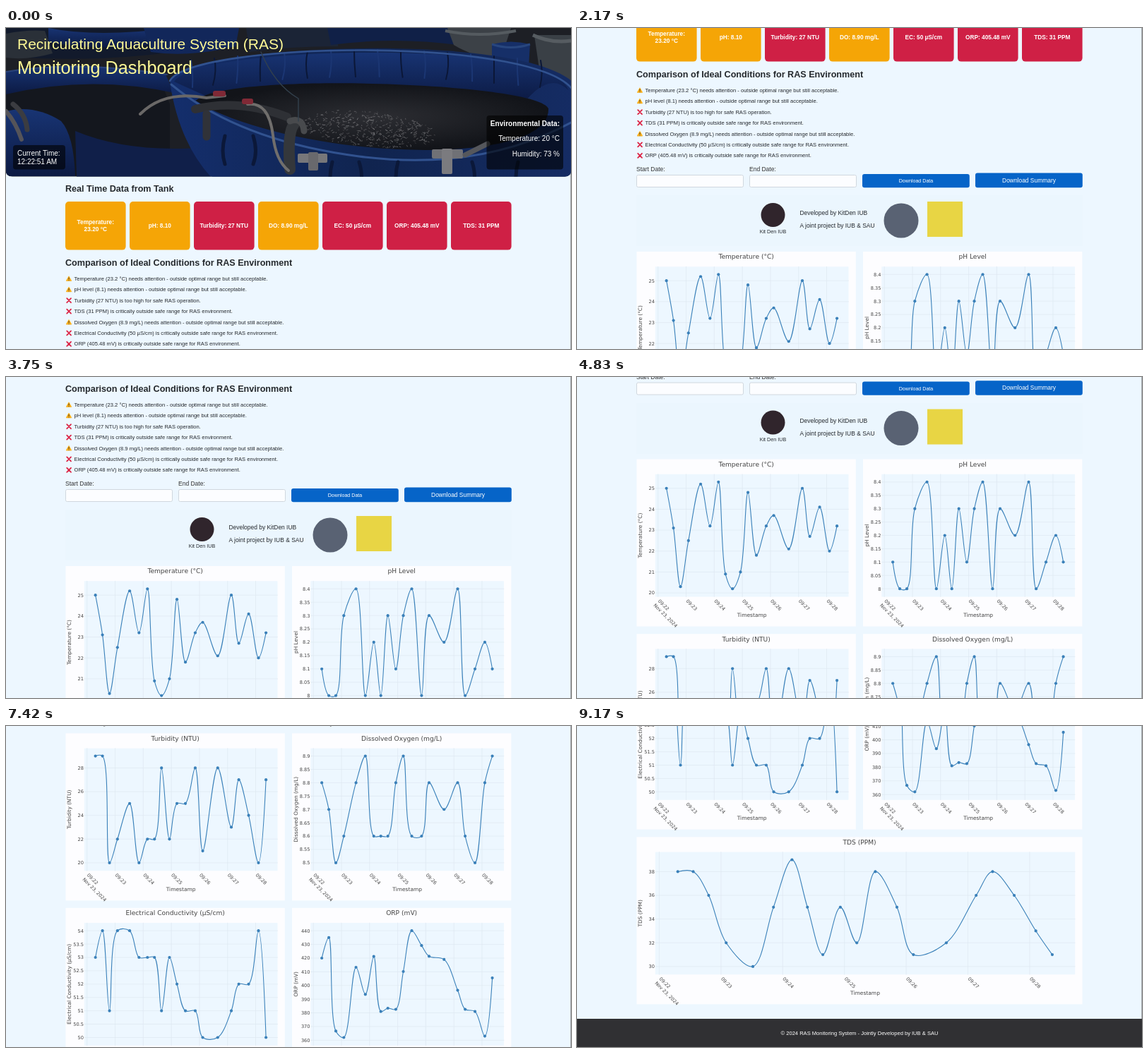
An HTML page for the animation above (9250 ms loop, 800 by 455 pixels).

```html
<!DOCTYPE html>
<html lang="en">
<head>
<meta charset="utf-8">
<title>Monitoring Dashboard</title>
<style>
  html, body { margin: 0; width: 100%; height: 100%; overflow: hidden; background: #edf7ff; }
  #stage { position: absolute; left: 0; top: 0; width: 800px; height: 455px; overflow: hidden; }
  #edge { position: absolute; right: 0; top: 0; width: 1px; height: 455px; background: #a3a8ad; }
  #page { position: absolute; left: 0; top: 0; display: block; }
  text { font-family: "Liberation Sans", Arial, sans-serif; white-space: pre; }
  .plot text { font-family: "DejaVu Sans", Verdana, sans-serif; fill: #444; }
</style>
</head>
<body>
<div id="stage">
  <div id="edge"></div>
  <svg id="page" width="800" height="1625" viewBox="0 0 800 1625"></svg>
</div>
<script>
const LOOP = 9250, FPS = 12;
const INK = '#25292d';

const text = (x, y, size, str, fill = INK, extra = '') =>
  `<text x="${x}" y="${y}" font-size="${size}" fill="${fill}" ${extra}>${str}</text>`;
const rect = (x, y, w, h, fill, r = 0, extra = '') =>
  `<rect x="${x}" y="${y}" width="${w}" height="${h}" rx="${r}" fill="${fill}" ${extra}/>`;
const path = (d, fill, extra = '') => `<path d="${d}" fill="${fill}" ${extra}/>`;
const stroke = (d, color, width) =>
  path(d, 'none', `stroke="${color}" stroke-width="${width}" stroke-linecap="round"`);
const BOLD = 'font-weight="700"', MID = 'text-anchor="middle"', END = 'text-anchor="end"';

function seeded(seed) {
  return () => (seed = (seed * 16807) % 2147483647) / 2147483647;
}

function hero() {
  const rnd = seeded(42);
  let foam = '', folds = '';
  for (let i = 0; i < 420; i++) {
    const a = rnd() * 6.283, r = Math.sqrt(rnd());
    const x = 512 + Math.cos(a) * r * 96, y = 143 + Math.sin(a) * r * 25 + (x - 512) * 0.09;
    const shade = 80 + Math.round(rnd() * 90 * (1.1 - r * 0.6));
    foam += stroke(`M${x.toFixed(1)} ${y.toFixed(1)}l${(rnd() * 6 - 3).toFixed(1)} ${(rnd() * 3 - 1).toFixed(1)}`,
      `rgb(${shade},${shade},${shade + 3})`, 0.7);
  }
  for (let i = 0; i < 16; i++) {
    const x = 262 + i * 33, top = 46 - 15 * Math.sin(i / 15 * Math.PI);
    folds += stroke(`M${x} ${top}q${rnd() * 8 - 4} 18 ${rnd() * 6 - 3} 38`, i % 2 ? '#0b1737' : '#1b3673', 2);
  }
  return `<defs>
    <clipPath id="heroClip"><path d="M0 0H800V202Q800 210.5 791 210.5H9Q0 210.5 0 202Z"/></clipPath>
    <linearGradient id="tarp" x2="0" y2="1"><stop stop-color="#183473"/><stop offset="1" stop-color="#0c1a43"/></linearGradient>
    <linearGradient id="wall" x2="1" y2="0"><stop stop-color="#142e6c"/><stop offset=".5" stop-color="#10244f"/><stop offset="1" stop-color="#152c64"/></linearGradient>
    <radialGradient id="water"><stop stop-color="#2d2e33"/><stop offset="1" stop-color="#121419"/></radialGradient>
  </defs><g clip-path="url(#heroClip)">`
    + rect(0, 0, 800, 211, '#1d1f25')
    + path('M0 0H250L238 34Q120 50 0 40Z', '#121a2c')
    + path('M60 0Q130 14 235 0V18Q150 36 60 20Z', 'url(#tarp)')
    + path('M0 8Q30 2 55 4L66 36Q30 46 0 42Z', '#2a3038')
    + path('M195 0H330L325 26Q260 42 205 34Z', '#12275a')
    + path('M340 0H470V26Q400 26 345 34Z', '#1b2436')
    + path('M455 0H640V24Q550 12 460 24Z', '#102047')
    + path('M625 0H715L700 46Q660 40 634 24Z', '#3c4147')
    + path('M622 4Q670 14 722 4', 'none', 'stroke="#555b60" stroke-width="4"')
    + path('M688 23Q715 16 742 23L738 88Q712 70 688 62Z', '#162f68')
    + path('M688 23Q715 32 742 23', 'none', 'stroke="#28467e" stroke-width="3"')
    + path('M748 10H800V112L760 92Z', '#3a4046')
    + path('M746 10Q772 22 800 18', 'none', 'stroke="#565c61" stroke-width="5"')
    // left tank
    + path('M0 74Q90 56 218 72L232 108V210H0Z', '#14171e')
    + path('M0 62Q100 44 226 66L238 92Q120 66 0 94Z', 'url(#tarp)')
    + path('M0 118Q40 108 78 132Q96 152 98 210H0Z', 'url(#tarp)')
    + path('M98 146Q170 176 270 170L290 211H100Z', '#101f49')
    + stroke('M0 62Q100 45 228 66', '#2a4379', 2)
    + stroke('M0 118Q14 134 22 158', '#555459', 6)
    + stroke('M10 108Q28 122 30 144', '#3b3c41', 7)
    // main tank
    + path('M232 75C250 20 780 2 812 90V211H292Z', 'url(#wall)')
    + path('M238 76C268 24 776 14 796 88Q770 62 735 104Q520 62 300 104Z', 'url(#tarp)') + folds
    + path('M268 104C300 62 750 76 768 114C772 198 420 190 268 104Z', 'url(#water)')
    + stroke('M232 75C262 18 772 10 806 94', '#31528f', 2.6)
    + foam
    + path('M232 76Q330 158 500 181T800 130V211H290Q244 160 232 76Z', 'url(#wall)')
    + stroke('M234 80Q330 160 500 182T800 134', '#31528f', 3)
    + [310, 350, 462, 500, 555, 660, 725].map((x, i) =>
      stroke(`M${x} ${i < 2 ? 153 : 190}q${i % 2 ? 7 : -6} 22 0 40`, '#0b1839', 5)).join('')
    // pipes and hoses
    + stroke('M268 115Q330 100 398 126', '#2e3035', 12)
    + stroke('M284 122V154', '#303238', 11)
    + stroke('M408 136Q398 148 402 200', '#34373b', 16)
    + stroke('M402 132Q420 126 422 146', '#484a4d', 9)
    + stroke('M190 122Q224 88 284 99L310 96', '#6a6867', 4)
    + stroke('M342 108Q372 104 378 152Q382 188 400 202', '#706e6c', 4)
    + stroke('M361 34Q380 80 414 100L414 132', '#33404d', 1.4)
    + rect(293, 89, 18, 8, '#802936', 3) + rect(334, 100, 16, 8, '#802936', 3)
    + rect(413, 178, 42, 13, '#77777a', 2) + rect(428, 176, 14, 26, '#69696d', 2)
    + rect(603, 172, 44, 13, '#707176', 2) + rect(617, 171, 15, 36, '#7b7b7f', 2)
    + stroke('M650 180L682 164', '#55575c', 7)
    + text(16, 30, 21, 'Recirculating Aquaculture System (RAS)', '#fffa96')
    + text(16, 65, 25.2, 'Monitoring Dashboard', '#fffa96')
    + rect(10, 166, 74, 34.5, 'rgba(0,0,0,.6)', 4)
    + text(16, 181, 10, 'Current Time:', '#fff')
    + text(16, 192.6, 10, '12:22:51 AM', '#fff', 'id="clock"')
    + rect(680.5, 124, 108.5, 76.5, 'rgba(0,0,0,.6)', 4)
    + text(784, 138.6, 10.1, 'Environmental Data:', '#fff', `${BOLD} ${END}`)
    + text(784, 160.4, 10, 'Temperature: 20 °C', '#fff', END)
    + text(784, 182.3, 10, 'Humidity: 73 %', '#fff', END)
    + '</g>';
}

function cards() {
  const labels = ['Temperature:|23.20 °C', 'pH: 8.10', 'Turbidity: 27 NTU', 'DO: 8.90 mg/L',
    'EC: 50 µS/cm', 'ORP: 405.48 mV', 'TDS: 31 PPM'];
  const mild = [0, 1, 3];
  return labels.map((label, i) => {
    const x = 84 + i * 91, lines = label.split('|');
    return rect(x, 246, 85.6, 68.6, mild.includes(i) ? '#f5a506' : '#cf2045', 5)
      + lines.map((line, k) => text(x + 42.8, 283.2 + (k - (lines.length - 1) / 2) * 10,
        8.3, line, '#fff', `${BOLD} ${MID}`)).join('');
  }).join('');
}

function notices() {
  const soft = 'needs attention - outside optimal range but still acceptable.';
  const hard = 'is critically outside safe range for RAS environment.';
  const rows = [
    ['Temperature (23.2 °C) ' + soft, 1], ['pH level (8.1) ' + soft, 1],
    ['Turbidity (27 NTU) is too high for safe RAS operation.', 0],
    ['TDS (31 PPM) ' + hard, 0], ['Dissolved Oxygen (8.9 mg/L) ' + soft, 1],
    ['Electrical Conductivity (50 µS/cm) ' + hard, 0], ['ORP (405.48 mV) ' + hard, 0]];
  return rows.map(([label, warn], i) => {
    const y = 355.2 + i * 15.4;
    const icon = warn
      ? path(`M89 ${y - 3}L92.4 ${y + 3}H85.6Z`, '#f9b01c', 'stroke="#f9b01c" stroke-width="1.2" stroke-linejoin="round"')
        + stroke(`M89 ${y - 1.2}v2M89 ${y + 2.4}v.1`, '#40352a', 1)
      : stroke(`M86.2 ${y - 2.8}l5.8 6M92 ${y - 2.8}l-5.8 6`, '#dc2546', 1.8);
    return icon + text(96.5, y + 2.7, 7.57, label);
  }).join('');
}

function form() {
  const field = (x, label) => text(x, 470, 8.5, label, '#333')
    + rect(x + .5, 475.5, 151, 17, '#fcfdff', 2, 'stroke="#d0d7de"');
  const button = (x, y, size, label) => rect(x, y, 151.8, 493.2 - y, '#0664c8', 3)
    + text(x + 76, (y + 493.2) / 2 + size * .34, size, label, '#fff', MID);
  return field(84, 'Start Date:') + field(244, 'End Date:')
    + button(404, 474, 7.1, 'Download Data') + button(564, 472.6, 8.44, 'Download Summary');
}

function credits() {
  return rect(84, 504, 632, 72, '#ebf6fe')
    + '<circle cx="277.5" cy="532" r="17" fill="#30252c"/>'
    + text(277.5, 558, 7.2, 'Kit Den IUB', INK, MID)
    + text(315.5, 532.3, 8.45, 'Developed by KitDen IUB')
    + text(315.5, 550.3, 8.45, 'A joint project by IUB &amp; SAU')
    + '<circle cx="459" cy="540" r="24.5" fill="#596273"/>'
    + rect(496, 513, 50, 50, '#e8d544');
}

const SECONDS = [18, 33, 48, 65, 91, 111, 129, 144, 159, 176, 192, 210, 231, 247, 279, 308, 324, 345, 366, 382];

// Centripetal Catmull-Rom spline with quadratic end pieces.
function spline(pts) {
  const handles = pts.slice(1, -1).map(([x, y], i) => {
    const [ax, ay] = [pts[i][0] - x, pts[i][1] - y];
    const [bx, by] = [pts[i + 2][0] - x, pts[i + 2][1] - y];
    const a = Math.hypot(ax, ay) ** .5, b = Math.hypot(bx, by) ** .5;
    const nx = b * b * ax - a * a * bx, ny = b * b * ay - a * a * by;
    const p = 3 * b * (a + b), q = 3 * a * (a + b);
    return [[x + nx / p, y + ny / p], [x - nx / q, y - ny / q]];
  });
  let d = `M${pts[0]}Q${handles[0][0]} ${pts[1]}`;
  for (let i = 2; i < pts.length - 1; i++) d += `C${handles[i - 2][1]} ${handles[i - 1][0]} ${pts[i]}`;
  return d + `Q${handles.at(-1)[1]} ${pts.at(-1)}`;
}

function chart(col, row, title, [lo, hi, step], values, wide = false) {
  const x = col ? 405 : 84.5, y = 584 + row * 247.6, w = wide ? 631 : 310.3;
  const left = x + 26.3, width = w - 36.6;
  const origin = left + (wide ? 5.7 : 3.9), minute = wide ? 87.4 : 39.8;
  const max = Math.max(...values), min = Math.min(...values);
  const px = s => origin + s / 60 * minute;
  const py = v => y + 32.3 + (max - v) / (max - min) * 151.3;
  let out = rect(x, y, w, 237, '#fdfdff') + rect(left, y + 21.3, width, 173.7, '#edf7ff');
  const grid = d => stroke(d, '#dee9f1', .7);

  for (let v = lo; v <= hi + step / 9; v += step) {
    out += grid(`M${left} ${py(v)}h${width}`)
      + text(left - .8, py(v) + 2.4, 6.6, parseFloat(v.toFixed(2)), INK, END);
  }
  for (let m = 0; m < 7; m++) {
    const tx = px(m * 60);
    out += grid(`M${tx} ${y + 21.3}v173.7`)
      + `<g transform="translate(${tx - .5} ${y + 201.5}) rotate(45)">${text(0, 0, 6.6, '09:2' + (2 + m))}`
      + (m ? '' : text(0, 8.6, 6.6, 'Nov 23, 2024')) + '</g>';
  }
  const pts = values.map((v, i) => [px(SECONDS[i]), py(v)]);
  out += stroke(spline(pts), '#3a80b9', 1.1)
    + pts.map(([cx, cy]) => `<circle cx="${cx}" cy="${cy}" r="2.1" fill="#3a80b9"/>`).join('')
    + text(x + w / 2, y + 10.4, 9.1, title, INK, MID)
    + text(left + width / 2, y + 223.4, 7.5, 'Timestamp', INK, MID)
    + `<g transform="translate(${x + 7.5} ${y + 108}) rotate(-90)">${text(0, 0, 7.4, title, INK, MID)}</g>`;
  return `<g class="plot">${out}</g>`;
}

const charts = () => [
  [0, 0, 'Temperature (°C)', [20, 25, 1],
    [25, 23.1, 20.3, 22.5, 25.2, 23.2, 25.3, 20.9, 20.2, 21, 24.8, 21.8, 23.2, 23.7, 22.1, 25, 22.7, 24.1, 22, 23.2]],
  [1, 0, 'pH Level', [8, 8.4, .05],
    [8.1, 8, 8, 8.3, 8.4, 8, 8.2, 8, 8.3, 8.1, 8.3, 8.4, 8, 8.3, 8.2, 8.4, 8, 8.1, 8.2, 8.1]],
  [0, 1, 'Turbidity (NTU)', [20, 28, 2],
    [29, 29, 20, 22, 25, 20, 22, 22, 28, 22, 25, 25, 28, 21, 28, 23, 27, 24, 20, 27]],
  [1, 1, 'Dissolved Oxygen (mg/L)', [8.5, 8.9, .05],
    [8.8, 8.7, 8.5, 8.6, 8.8, 8.9, 8.6, 8.6, 8.6, 8.8, 8.9, 8.6, 8.6, 8.8, 8.7, 8.8, 8.6, 8.5, 8.8, 8.9]],
  [0, 2, 'Electrical Conductivity (µS/cm)', [50, 54, .5],
    [53, 54, 51, 54, 54, 53, 53, 53, 51, 53, 52, 51, 51, 50, 50, 51, 52, 52, 54, 50]],
  [1, 2, 'ORP (mV)', [360, 440, 10],
    [420, 435, 366.7, 362, 413.3, 393.5, 421.2, 381, 383.4, 382.6, 410.2, 440, 429.2, 421.3, 419, 396.5, 382.6, 381, 363, 405.5]],
  [0, 3, 'TDS (PPM)', [30, 38, 2],
    [38, 38, 36, 32, 30, 35, 39, 35, 31, 35, 32, 38, 35, 31, 32, 36, 38, 36, 33, 31], true],
].map(args => chart(...args)).join('');

const page = document.getElementById('page');
page.innerHTML = hero()
  + text(84, 232.4, 12.6, 'Real Time Data from Tank', INK, BOLD) + cards()
  + text(84, 336.6, 12.6, 'Comparison of Ideal Conditions for RAS Environment', INK, BOLD) + notices()
  + form() + credits() + charts()
  + rect(0, 1584.5, 800, 41, '#303033')
  + text(400, 1607, 7.57, '© 2024 RAS Monitoring System - Jointly Developed by IUB &amp; SAU', '#fff', MID);
const clock = document.getElementById('clock');

// Scroll position over time: [ms, px]
const SCROLL = [[0, 0], [1750, 0], [1920, 130], [2080, 230], [2170, 267], [2330, 295], [2830, 295],
  [3750, 316], [4790, 460], [5830, 654], [6170, 758], [6920, 758], [7420, 821.3],
  [7920, 960], [8330, 1130], [8500, 1169.5], [LOOP, 1169.5]];

function scrollAt(t) {
  const i = SCROLL.findIndex(([time]) => time > t);
  const [t0, y0] = SCROLL[i - 1], [t1, y1] = SCROLL[i];
  return y0 + (y1 - y0) * (t - t0) / (t1 - t0);
}

function draw(now) {
  const t = now % LOOP;
  const step = Math.floor((t + 4) * FPS / 1000) % (LOOP * FPS / 1000);
  const shown = Math.round(step * 100 / FPS) * 10;
  page.style.transform = `translateY(${-scrollAt(shown)}px)`;
  clock.textContent = `12:22:${shown < 1420 ? 51 : 52} AM`;
}

const start = performance.now();
function tick() {
  draw(performance.now() - start);
  requestAnimationFrame(tick);
}
tick();
</script>
</body>
</html>
```
